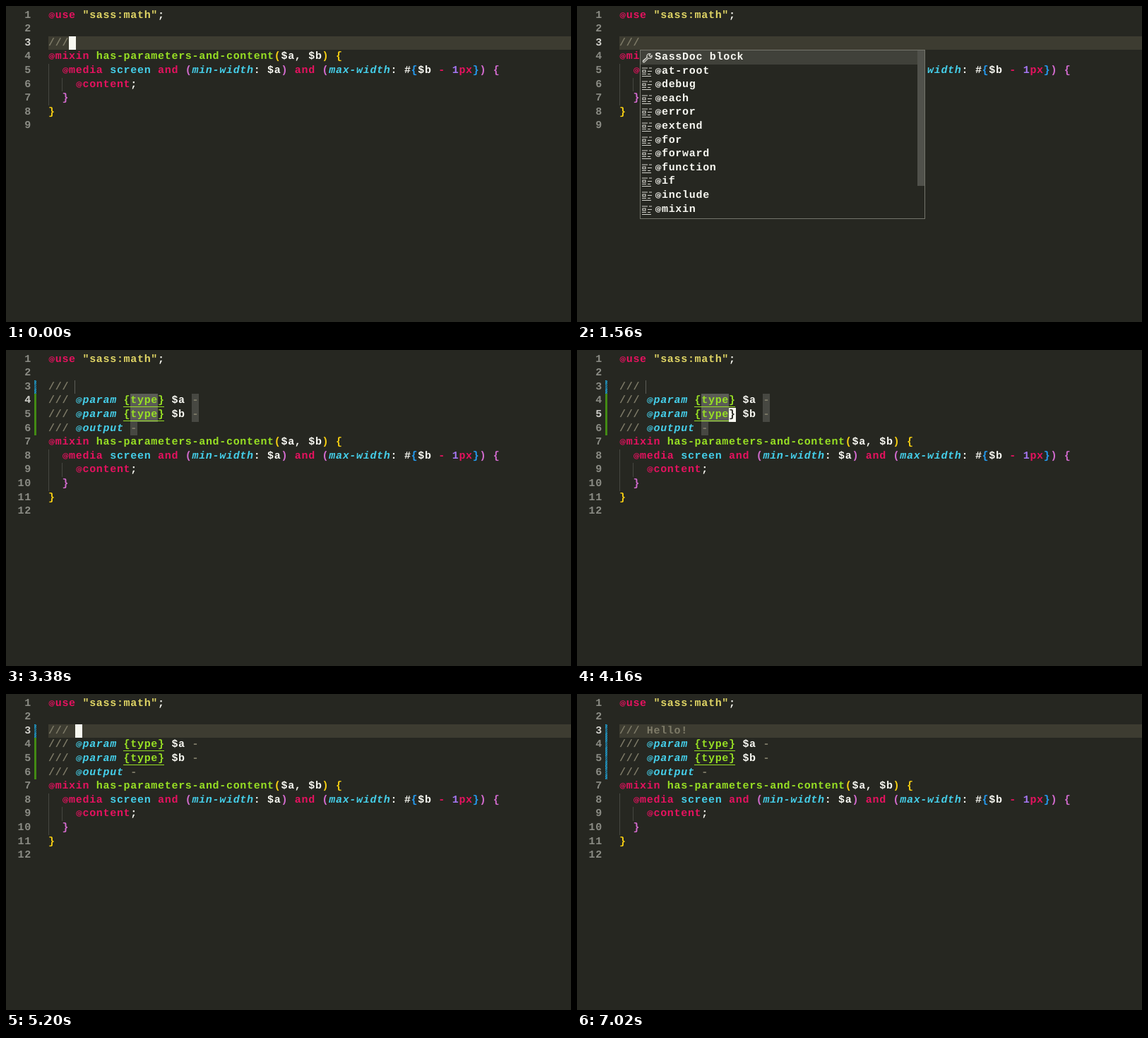
Animation, 800 px wide and 448 px high, one loop 7.15 s. Source, as an HTML page:

```html
<!DOCTYPE html>
<html lang="en">
<head>
<meta charset="utf-8">
<title>SassDoc snippet</title>
<style>
  html, body { margin: 0; width: 100%; height: 100%; overflow: hidden; background: #262721; }
  #stage {
    position: absolute; left: 0; top: 0; width: 800px; height: 448px; overflow: hidden;
    font: bold 15px/19.6px "Liberation Mono", monospace; letter-spacing: .69px;
    text-rendering: geometricPrecision; color: #f8f8f2;
  }
  #stage * { position: absolute; white-space: pre; }
  #stage .at {
    position: static; display: inline-block; width: 9.69px; vertical-align: 1px;
    font: bold 9.69px/0 "DejaVu Sans", sans-serif; font-style: inherit; letter-spacing: 0;
  }
  .p { color: #e5125f; }
  .s { color: #e0d565; }
  .g { color: #98e024; }
  .c { color: #45cfea; }
  .i { color: #45cfea; font-style: italic; }
  .y { color: #f7cf12; }
  .o { color: #d36bcf; }
  .b { color: #259cf2; }
  .n { color: #a677f5; }
  .k { color: #7e7b68; }
  .num { color: #8b8c85; }
  .num.on { color: #d0d0cb; }
  .row { background: #3d3c31; }
  .guide { background: #464741; }
  .hole { background: #474842; }
  .sel { background: #5b5c56; }
  .stop { background: #5c5d57; }
  .under { background: #98e024; }
  .add { background: #438a14; }
  .mod { background: repeating-linear-gradient(-45deg, #2394bd 0 1px, #1d5a72 1px 2px); }
  .cur { background: #f8f8f0; color: #262721; }
  #popup { left: 89px; top: 62px; width: 402px; height: 238px; background: #262721; border: 1px solid #74756c; }
  #popup .pick { left: 0; top: 0; width: 402px; height: 20px; background: #40413a; }
  #popup .bar { left: 392px; top: 0; width: 10px; height: 192px; background: #50514b; }
  #popup svg { left: 2px; fill: none; stroke: #d2d2cc; stroke-width: 1.2; }
</style>
</head>
<body>
<div id="stage"></div>
<script>
const LOOP = 7150, W = 9.69, H = 19.6, X0 = 59.7, Y0 = 3.6;
const stage = document.getElementById('stage');

// "~x" switches to colour class x
const head = ['~p@use ~s"sass:math"~w;', ''];
const body = [
  '~p@mixin ~ghas-parameters-and-content~y(~w$a, $b~y) {',
  '~w  ~p@media ~cscreen ~pand ~o(~imin-width~w: $a~o) ~pand ~o(~imax-width~w: #~b{~w$b ~p- ~n1~ppx~b}~o) {',
  '~w    ~p@content~w;',
  '~w  ~o}',
  '~y}',
  ''
];
const param = name => `~k/// ~i@param ~g{type} ~w${name} ~k-`;
const plain = [...head, '~k///', ...body];
const documented = text =>
  [...head, '~k/// ' + text, param('$a'), param('$b'), '~k/// ~i@output ~k-', ...body];

const items = ['SassDoc block',
  ...'at-root debug each error extend for forward function if include mixin'.split(' ').map(s => '@' + s)];

// Snippet placeholders: row, column, length
const HOLES = [[4, 12, 4], [4, 21, 1], [5, 12, 4], [5, 21, 1], [6, 12, 1]];

// Each step moves the caret and restarts its blink
const steps = [
  { t: 0, row: 3, col: 3 },
  { t: 2470, hole: 0 },
  { t: 3510, hole: 1 },
  { t: 4030, hole: 2 },
  { t: 4420, hole: 3 },
  { t: 4680, hole: 4 },
  { t: 4940, row: 3, col: 4, text: '' }
];
[...'Hello!'].forEach((_, n) =>
  steps.push({ t: 5720 + 130 * n, row: 3, col: 5 + n, text: 'Hello!'.slice(0, n + 1) }));

const x = col => X0 + col * W;
const y = row => Y0 + (row - 1) * H;
const at = s => s.replace(/@/g, '<span class="at">@</span>');
const box = (cls, left, top, w, h, text = '') =>
  `<div class="${cls}" style="left:${left}px;top:${top}px;width:${w}px;height:${h}px">${text}</div>`;
const label = (cls, left, top, text) =>
  `<span class="${cls}" style="left:${left + .3}px;top:${top}px">${at(text)}</span>`;

// Boxes that fill a text row sit on whole pixels
const cell = (cls, left, row, w, text) => {
  const top = Math.round(y(row));
  return box(cls, Math.round(left), top, Math.round(w), Math.round(y(row + 1)) - top, text);
};

function drawLine(src, row) {
  let col = 0, out = '';
  for (const part of src.split('~').slice(1)) {
    const text = part.slice(1);
    out += label(part[0], x(col), y(row), text);
    col += text.length;
  }
  const indent = src.startsWith('~w ') ? src.slice(2).match(/^ */)[0].length : 0;
  for (let c = 0; c < indent; c += 2) out += cell('guide', x(c), row, 1);
  if (src.includes('{type}')) out += box('under', x(11), Math.round(y(row)) + 17.5, 6 * W, 1.3);
  return out;
}

function popup() {
  const wrench = '<path d="M2 13l6-6M7 8c-1-4 2-6 5-5l-2 2 2 2 2-2c1 3-2 5-5 4l-6 6c-2 0-2-2-1-3z"/>';
  const list = '<path d="M0 3h8M10 3h4M1 6h4v3H1zM8 7.5h6M0 11.5h6M8 11.5h4M0 14.5h13"/>';
  const rows = items.map((name, n) =>
    `<svg width="15" height="17" style="top:${n * H + 2}px">${n ? list : wrench}</svg>` +
    label('w', 20, n * H, name));
  return `<div id="popup"><div class="pick"></div>${rows.join('')}<div class="bar"></div></div>`;
}

function gutter(t) {
  let out = '';
  for (let row = 3; row <= 6; row++)
    out += cell(row === 3 || t >= 6240 ? 'mod' : 'add', 40, row, 3);
  return out;
}

function scene(t) {
  const step = steps.filter(s => s.t <= t).pop();
  const hole = HOLES[step.hole];
  const row = hole ? hole[0] : step.row;
  const col = hole ? hole[1] + hole[2] : step.col;
  const lines = t < 2470 ? plain : documented(step.text || '');
  let out = '';

  if (hole) {
    HOLES.forEach(([r, c, n], k) => {
      const active = k === step.hole || (n === 4 && hole[2] === 4);
      out += cell(active ? 'sel' : 'hole', x(c), r, n * W);
    });
    out += cell('stop', 97, 3, 1);
  } else {
    out += cell('row', X0, row, 800 - X0);
  }

  lines.forEach((src, n) => {
    const num = String(n + 1);
    out += label(n + 1 === row ? 'num on' : 'num', 35.7 - num.length * W, y(n + 1), num);
    out += drawLine(src, n + 1);
  });

  if (t >= 2990) out += gutter(t);
  if ((t - step.t) % 1000 < 500) {
    const under = hole && hole[2] === 4 ? '}' : '';
    out += cell('cur', x(col), row, W, under);
  }
  if (t >= 1300 && t < 2470) out += popup();
  return out;
}

let shown = '';
function tick() {
  const t = performance.now() % LOOP;
  const html = scene(Math.floor(t / 130) * 130);
  if (html !== shown) stage.innerHTML = shown = html;
  requestAnimationFrame(tick);
}
tick();
</script>
</body>
</html>
```
